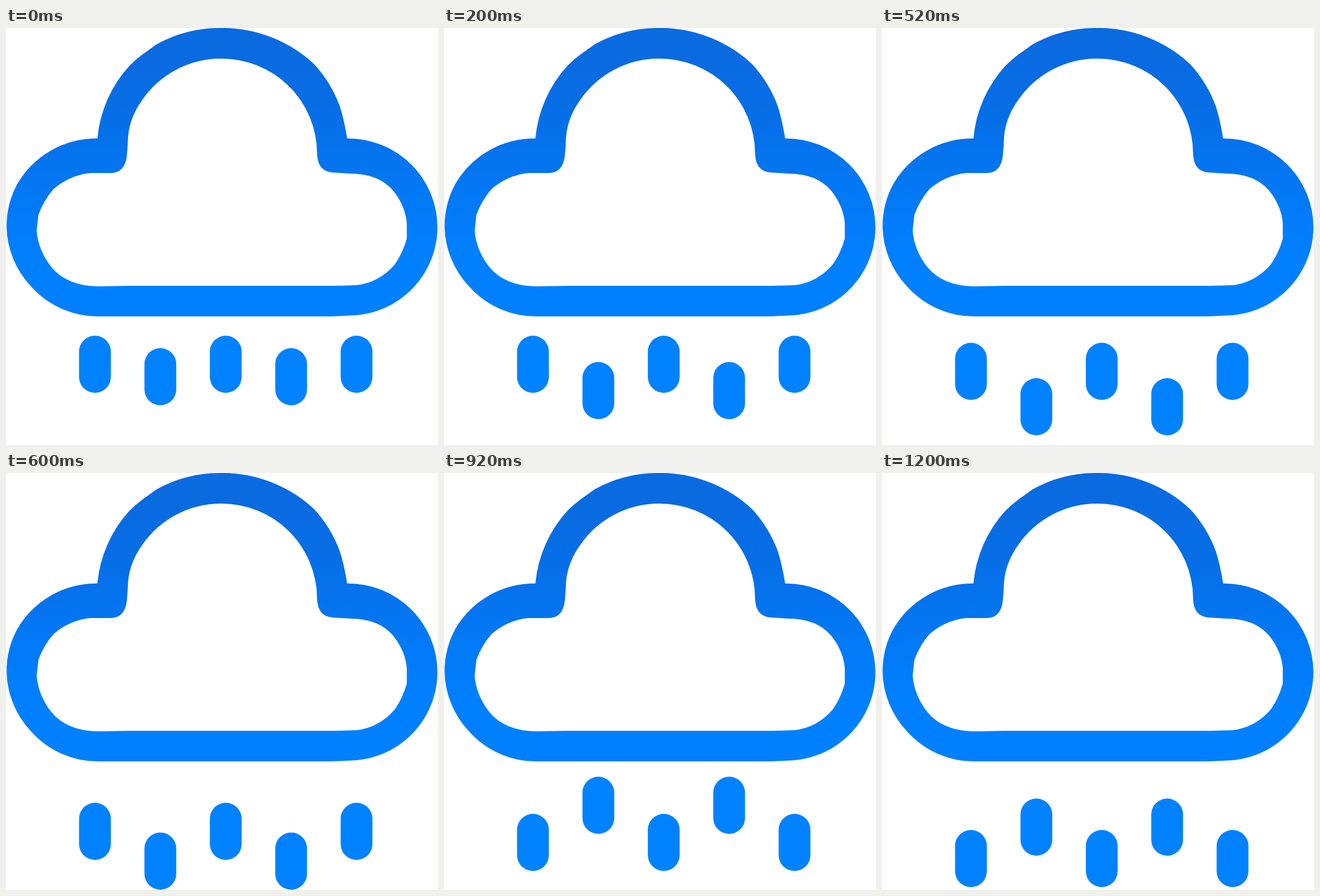
Animation of 761x736 px, one loop 1.4 s. Source, as an HTML page:

```html
<!DOCTYPE html>
<html lang="en">
<head>
<meta charset="utf-8">
<title>Rain cloud</title>
<style>
  html, body { margin: 0; width: 100%; height: 100%; overflow: hidden; background: #fff; }
  svg { display: block; width: 761px; height: 736px; }
</style>
</head>
<body>
<svg viewBox="0 0 761 736">
  <defs>
    <linearGradient id="sky" gradientUnits="userSpaceOnUse" x1="0" y1="40" x2="0" y2="400">
      <stop offset="0" stop-color="#0a6ae0"/>
      <stop offset=".3" stop-color="#066ee6"/>
      <stop offset="1" stop-color="#0080ff"/>
    </linearGradient>
  </defs>
  <path fill="url(#sky)" fill-rule="evenodd" d="
    M161 195 A220 220 0 0 1 218 66 Q228 56 240 47 L265 29
    A228 228 0 0 1 378 0 A237 237 0 0 1 543 64
    A225 225 0 0 1 588 138 Q595 159 601 195
    A157 157 0 0 1 760 354 A157 157 0 0 1 742 424
    A157 157 0 0 1 617 507 L575 509 H166
    A158 158 0 0 1 44 456 A158 158 0 0 1 1 350
    A158 158 0 0 1 20 275 A161 161 0 0 1 161 195 Z
    M378 54 A168 168 0 0 0 240 127 Q214 163 214.500 205 L213 224
    Q210 256 184 256 H148 Q112 260 84 284 Q67 303 57 330
    L54 358 Q57 393 80 422 Q107 455 162 456 L220 455 H580
    L616 454 A102 102 0 0 0 685 417 Q698 399 706 372 V345
    Q704 315 682 287 Q656 257 607 257 L575 255
    Q549 253 548 222 A168 168 0 0 0 378 54 Z"/>
  <g id="rain" fill="#0082ff"></g>
</svg>
<script>
  const STEP = 200;
  // Top edge of the outer and inner drops at each step of the fall
  const outer = [543, 543, 555.5, 582, 601.5, 619.5, 630];
  const inner = [565, 589.5, 618, 634.5, 536, 558, 574.5];
  const rain = document.getElementById('rain');

  const drops = Array.from({ length: 5 }, (_, i) => {
    const drop = document.createElementNS('http://www.w3.org/2000/svg', 'rect');
    const attrs = { x: 128.7 + i * 115.2, width: 56, height: 101, rx: 28 };
    for (const key in attrs) drop.setAttribute(key, attrs[key]);
    return rain.appendChild(drop);
  });

  function draw(now) {
    const step = Math.floor(now / STEP) % outer.length;
    drops.forEach((drop, i) => drop.setAttribute('y', (i % 2 ? inner : outer)[step]));
    requestAnimationFrame(draw);
  }
  draw(performance.now());
</script>
</body>
</html>
```
